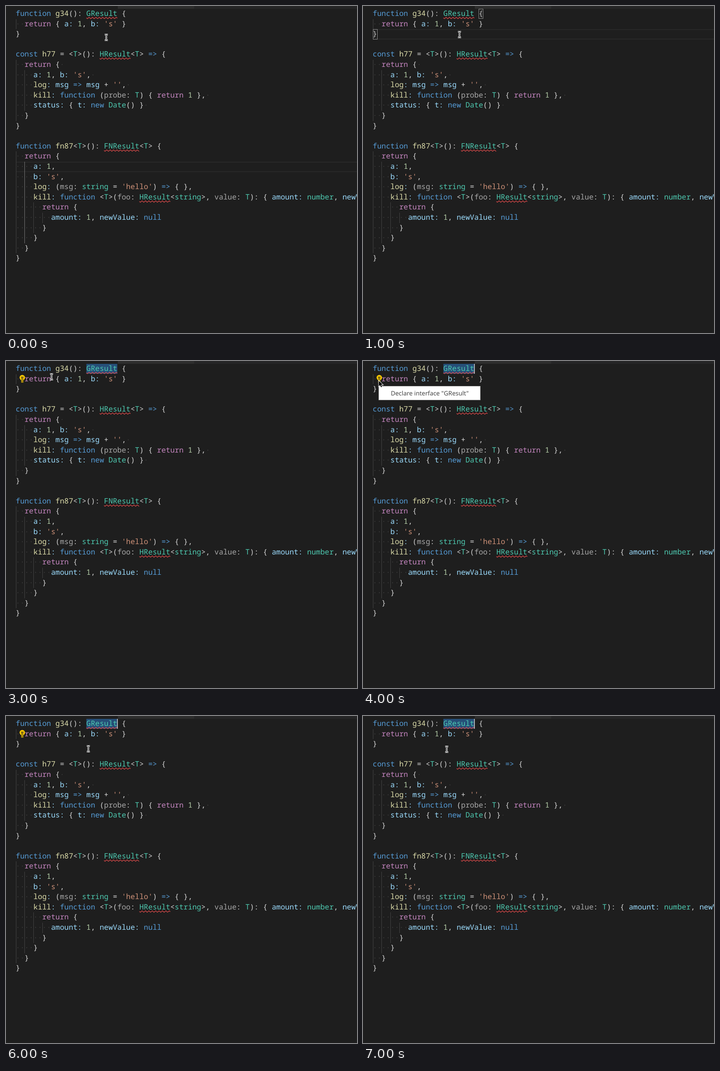
These frames come from a looping animation (744 by 693 pixels, 8000 ms). An HTML page with a canvas:

```html
<!DOCTYPE html>
<html lang="en">
<head>
<meta charset="utf-8">
<title>Declare interface quick fix</title>
<style>
html, body { margin: 0; width: 100%; height: 100%; overflow: hidden; background: #1e1e1e; }
canvas { display: block; }
</style>
</head>
<body>
<canvas id="stage" width="744" height="693"></canvas>
<script>
const ctx = document.getElementById('stage').getContext('2d');
// Editor metrics: 13px type on 18px lines, zoomed by 1.2.
const ZOOM = 1.2, FONT = 13 * ZOOM, LINE = 18 * ZOOM, CHAR = FONT * 0.6;
const LEFT = 20.6, TOP = 6;

// Trailing spaces matter: they are shown as dots.
const code = [
  "function g34(): GResult {",
  "  return { a: 1, b: 's' }",
  "}",
  "",
  "const h77 = <T>(): HResult<T> => {",
  "  return { ",
  "    a: 1, b: 's', ",
  "    log: msg => msg + '', ",
  "    kill: function (probe: T) { return 1 }, ",
  "    status: { t: new Date() } ",
  "  }",
  "}",
  "",
  "function fn87<T>(): FNResult<T> {",
  "  return {",
  "    a: 1,",
  "    b: 's',",
  "    log: (msg: string = 'hello') => { },",
  "    kill: function <T>(foo: HResult<string>, value: T): { amount: number, newValue",
  "      return {",
  "        amount: 1, newValue: null",
  "      }",
  "    }",
  "  }",
  "}",
];

const rules = [
  [/'[^']*'/, '#ce9178'],
  [/\breturn\b/, '#c586c0'],
  [/\b(?:function|const|new|null)\b|=>/, '#569cd6'],
  [/\b(?:\w+Result|T|Date|string|number)\b/, '#4ec9b0'],
  [/\b(?:g34|h77|fn87|log|kill)\b/, '#dcdcaa'],
  [/\b(?:probe|foo|value|msg(?=:))\b/, '#a8a8a8'],
  [/\b\d+\b/, '#b5cea8'],
  [/\b[a-z]\w*:?|(?<=log|kill):/i, '#9cdcfe'],
  [/[^\s\w']/, '#d4d4d4'],
];
const tokenPattern = new RegExp(rules.map(([r]) => `(${r.source})`).join('|'), 'g');
const tokens = code.flatMap((text, row) => [...text.matchAll(tokenPattern)].map(m => ({
  text: m[0], row, col: m.index,
  color: rules[m.slice(1).findIndex(group => group !== undefined)][1],
})));

// One entry per second.
const scenes = [
  { beam: [212.5, 66.5], row: 15, activeGuide: true },
  { beam: [204.5, 60.5], row: 2, brackets: true },
  { beam: [195.5, 19.5], row: 0 },
  { beam: [96.5, 33.5], selected: true, bulb: true },
  { arrow: [33, 41], selected: true, bulb: true, caret: true, menu: 'idle' },
  { arrow: [174, 69], selected: true, bulb: true, caret: true, menu: 'hover' },
  { beam: [174.5, 69.5], selected: true, bulb: true, caret: true },
  { beam: [177.5, 70.5], selected: true, caret: true },
];

const colX = col => LEFT + col * CHAR;
const rowY = row => Math.round(TOP + row * LINE);
const baseline = row => Math.round(21 + row * LINE);

function box(x, y, w, h, color) {
  ctx.fillStyle = color;
  ctx.fillRect(x, y, w, h);
}

function label(text, x, y, color, font) {
  ctx.font = font;
  ctx.fillStyle = color;
  ctx.fillText(text, x, y);
}

function stroke(path, color, width) {
  ctx.strokeStyle = color;
  ctx.lineWidth = width;
  ctx.stroke(path);
}

function drawGuide(col, firstRow, lastRow, color) {
  const y = rowY(firstRow);
  box(Math.round(colX(col)), y, 1, rowY(lastRow + 1) - y, color);
}

function drawWhitespace() {
  code.forEach((text, row) => {
    const indent = text.search(/\S|$/), end = text.trimEnd().length;
    for (let col = 0; col < text.length; col++) {
      if (col < indent || col >= end) {
        box(colX(col + 0.5) - 0.8, baseline(row) - 5.8, 1.6, 1.6, '#414141');
      }
    }
    for (let col = 0; col < indent; col += 2) drawGuide(col, row, row, '#404040');
  });
}

function drawSquiggle({ text, row, col }) {
  const path = new Path2D(), x = colX(col), y = baseline(row) + 4.4;
  for (let dx = 0; dx <= text.length * CHAR; dx += 0.5) {
    const wave = Math.asin(Math.cos((dx / (6 * ZOOM) - 0.3) * 2 * Math.PI));
    path.lineTo(x + dx, y + wave);
  }
  stroke(path, '#e24a4a', 1.2);
}

function drawBulb() {
  ctx.fillStyle = '#fc0';
  ctx.beginPath();
  ctx.arc(34.5, 35.3, 5.7, 0, Math.PI * 2);
  ctx.fill();
  box(32, 39, 5, 6.5, '#fc0');
  box(32, 41.3, 5, 0.9, '#1e1e1e');
  box(32, 43.4, 5, 0.9, '#1e1e1e');
  stroke(new Path2D('M31.5 34h6M33.3 34v6M35.7 34v6'), '#1e1e1e', 1.1);
}

function drawMenu(hover) {
  box(33, 53, 216, 30, '#b8b8b8');
  box(34, 54, 214, 28, '#fff');
  if (hover) box(34, 56, 214, 24, '#16a085');
  label('Declare interface "GResult"', 59, 73, hover ? '#fff' : '#444', '13px "Noto Sans", sans-serif');
}

function drawPointer([x, y], shape, layers) {
  ctx.save();
  ctx.translate(x, y);
  const path = new Path2D(shape);
  layers.forEach(([color, width]) => stroke(path, color, width));
  if (shape.endsWith('z')) {
    ctx.fillStyle = '#000';
    ctx.fill(path);
  }
  ctx.restore();
}

function draw(scene) {
  box(0, 0, 744, 693, '#1e1e1e');
  box(237, 0, 162, 6, '#2d2d2d');
  box(399, 0, 345, 6, '#252526');

  if (scene.row !== undefined) {
    box(21, rowY(scene.row), 723, 2, '#282828');
    box(21, rowY(scene.row + 1) - 2, 723, 2, '#282828');
  }
  if (scene.selected) box(colX(16), TOP, 7 * CHAR, LINE - 0.6, '#264f78');
  drawWhitespace();
  if (scene.activeGuide) drawGuide(2, 15, 22, '#707070');
  if (scene.brackets) {
    ctx.strokeStyle = '#888';
    ctx.lineWidth = 1;
    ctx.strokeRect(245.5, 6.5, 9, 20);
    ctx.strokeRect(21.5, 49.5, 9, 21);
  }

  for (const token of tokens) {
    label(token.text, colX(token.col), baseline(token.row), token.color,
      `${FONT}px "Noto Sans Mono", monospace`);
    if (token.text.endsWith('Result')) drawSquiggle(token);
  }

  if (scene.caret) box(235.5, 6, 1.5, 21, '#d0d0d0');
  if (scene.bulb) drawBulb();
  if (scene.menu) drawMenu(scene.menu === 'hover');
  if (scene.beam) {
    drawPointer(scene.beam, 'M-3.5-6h2.5l1 1 1-1h2.5M0-5v10M-3.5 6h2.5l1-1 1 1h2.5',
      [['#fff', 3.2], ['#000', 1]]);
  }
  if (scene.arrow) {
    drawPointer(scene.arrow, 'M0.5 1v11.5l2.7-2.5 2 4.6 2-.9-2-4.4h3.8z', [['#fff', 1.8]]);
  }
}

ctx.textRendering = 'geometricPrecision';
const start = performance.now();
function tick() {
  const time = Math.max(0, performance.now() - start) % 8000;
  draw(scenes[Math.floor(time / 1000)]);
  requestAnimationFrame(tick);
}
tick();
</script>
</body>
</html>
```
